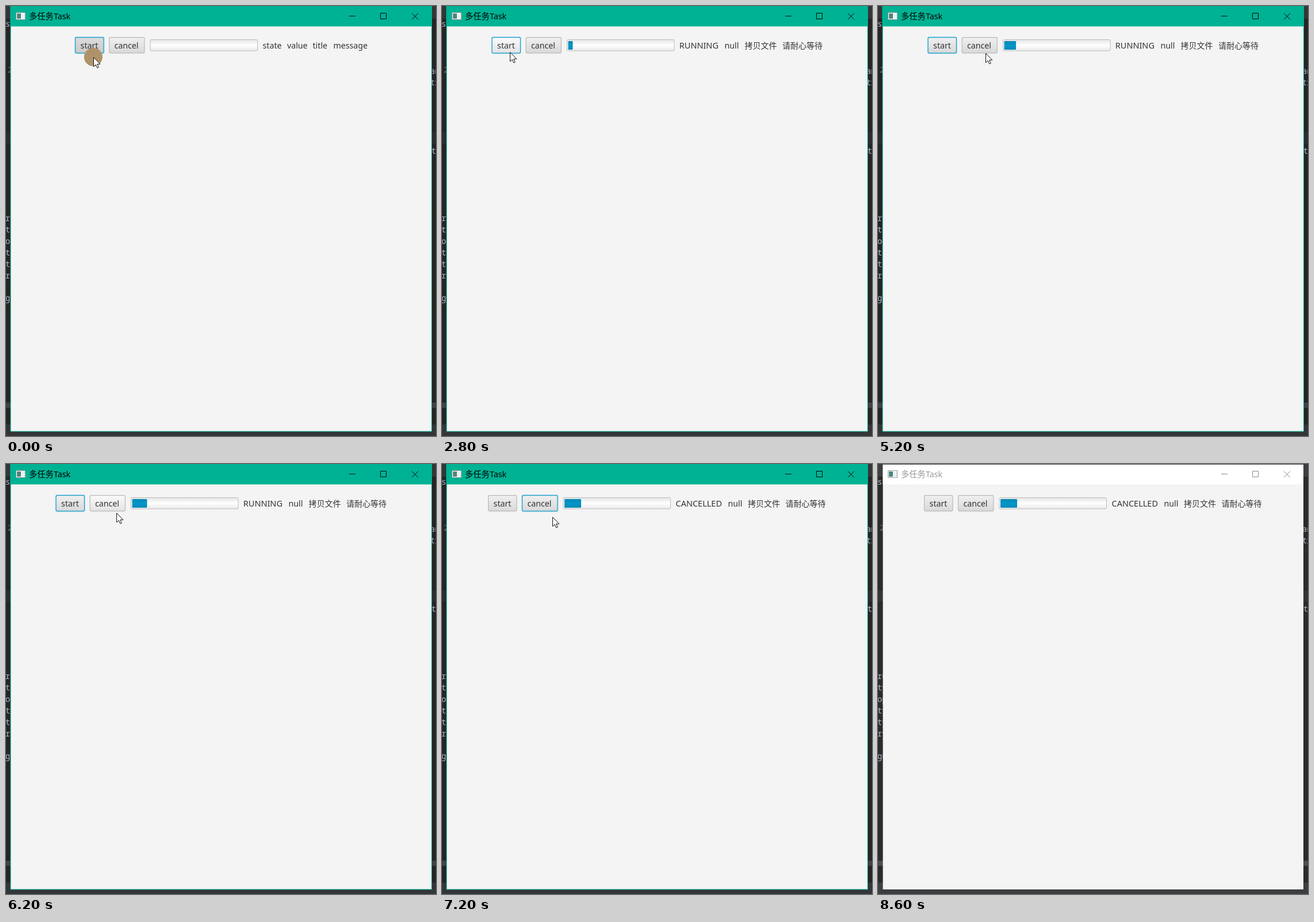
Write an HTML page that moves like this. It is 748 by 748 pixels and loops after 8800 ms.

```html
<!DOCTYPE html>
<html lang="zh">
<head>
<meta charset="utf-8">
<title>Task</title>
<style>
html, body { margin: 0; width: 100%; height: 100%; overflow: hidden; background: #2b2b2b; }
svg { display: block; width: 100vw; height: 100vh; }
text { font: 14.2px "Noto Sans", "Noto Sans CJK SC", "Noto Sans CJK", sans-serif; fill: #333; white-space: pre; }
.code text { font: 13.6px "Noto Sans Mono", "DejaVu Sans Mono", monospace; fill: #a9b7c6; }
.code .dim { fill: #70757a; }
.caps { font-size: 14.5px; }
.zh { font-size: 14px; }
.frame { fill: #f4f4f4; stroke: #00b294; }
.bar { fill: #00b294; }
#title { fill: #000; font-size: 14.3px; }
.ctl { fill: none; stroke: #000; }
.off .frame { stroke: none; }
.off .bar { fill: #fff; }
.off #title { fill: #999; }
.off .ctl { stroke: #888; }
.off #shade { display: none; }
.btn .edge { fill: #b9b9b9; }
.btn .body { fill: url(#normal); }
.btn.hover .body { fill: url(#hover); }
.btn.press .body { fill: url(#press); }
.btn .glow { fill: none; }
.btn.focus .edge { fill: #1a9fcb; }
.btn.focus .glow { fill: #b9e0ee; }
.labels { display: none; }
.labels.on { display: inline; }
</style>
</head>
<body>
<svg viewBox="0 0 748 748" id="stage">
  <defs>
    <linearGradient id="normal" x2="0" y2="1"><stop stop-color="#efefef"/><stop offset="1" stop-color="#d9d9d9"/></linearGradient>
    <linearGradient id="hover" x2="0" y2="1"><stop stop-color="#fafafa"/><stop offset="1" stop-color="#e3e3e3"/></linearGradient>
    <linearGradient id="press" x2="0" y2="1"><stop stop-color="#dcdcdc"/><stop offset="1" stop-color="#c9c9c9"/></linearGradient>
    <linearGradient id="track" x2="0" y2="1"><stop stop-color="#e4e4e4"/><stop offset=".5" stop-color="#fff"/><stop offset="1" stop-color="#e9e9e9"/></linearGradient>
    <linearGradient id="fill" x2="0" y2="1"><stop stop-color="#0587b5"/><stop offset=".5" stop-color="#0296c8"/><stop offset="1" stop-color="#0589b8"/></linearGradient>
  </defs>

  <!-- editor behind the window -->
  <rect width="748" height="748" fill="#2b2b2c"/>
  <rect width="748" height="22" fill="#3c3f41"/>
  <rect y="220" width="748" height="19" fill="#343537"/>
  <rect y="690" width="748" height="9" fill="#4b4e51"/>
  <rect y="728" width="748" height="20" fill="#3c3f42"/>
  <rect id="shade" width="748" height="748" opacity=".15"/>
  <g class="code">
    <text x="-1" y="36">st</text><text x="3" y="116" class="dim">2</text>
    <text x="-1" y="374">re</text><text x="-1" y="394">ty</text>
    <text x="-1" y="414">op</text><text x="-1" y="434">ty</text>
    <text x="-1" y="454">ty</text><text x="-1" y="474">ry</text>
    <text x="-1" y="513">ge</text>
    <text x="738" y="118">an</text><text x="738" y="138">tr</text><text x="740" y="257">t</text>
  </g>

  <!-- window -->
  <rect class="frame" id="frame" x="8" y="-.5" width="732.5" height="740.5"/>
  <rect class="bar" id="bar"/>
  <rect x="17.5" y="11.5" width="16" height="12" fill="#fff" stroke="#8d9a98"/>
  <rect x="19" y="13" width="7" height="9" fill="#4c8580"/>
  <path d="M28.5 13v9M31.5 13v9" stroke="#c4d3d3"/>
  <text id="title" x="40" y="23">多任务Task</text>
  <path class="ctl" d="M597 17.5h11M651.5 12.5h10v10h-10zM706 12.5l11 11M717 12.5l-11 11"/>

  <!-- controls -->
  <g id="row">
    <g class="btn" id="start">
      <rect class="glow" x="-1" y="53" width="52.5" height="30.5" rx="4"/>
      <rect class="edge" x="0" y="54" width="50.5" height="28.5" rx="3"/>
      <rect class="body" x="1.2" y="55.2" width="48.1" height="26.1" rx="2"/>
      <text x="9.6" y="74">start</text>
    </g>
    <g class="btn" id="cancel">
      <rect class="glow" x="58" y="53" width="64.5" height="30.5" rx="4"/>
      <rect class="edge" x="59" y="54" width="62.5" height="28.5" rx="3"/>
      <rect class="body" x="60.2" y="55.2" width="60.1" height="26.1" rx="2"/>
      <text x="68.5" y="74">cancel</text>
    </g>
    <rect x="131" y="58.5" width="186.5" height="19.5" rx="2" fill="url(#track)" stroke="#bcbcbc"/>
    <rect id="fillBar" x="133" y="61" height="15" rx="1.5" fill="url(#fill)"/>
  </g>
  <g class="labels">
    <text x="446.5" y="74">state</text><text x="489" y="74">value</text>
    <text x="533.5" y="74">title</text><text x="569.5" y="74">message</text>
  </g>
  <g class="labels">
    <text class="caps" x="412.8" y="74">RUNNING</text><text x="491.5" y="74">null</text>
    <text class="zh" x="526.5" y="74">拷贝文件</text><text class="zh" x="592" y="74">请耐心等待</text>
  </g>
  <g class="labels">
    <text class="caps" x="406.5" y="74">CANCELLED</text><text x="497.5" y="74">null</text>
    <text class="zh" x="532" y="74">拷贝文件</text><text class="zh" x="597.5" y="74">请耐心等待</text>
  </g>

  <circle id="click" r="16" fill="#b0926a"/>
  <path id="cursor" d="M.5.5V16.5L4.2 13.1 6.8 18.8 9.2 17.7 6.7 12.1H11.8Z" fill="#fff" stroke="#111" stroke-linejoin="round"/>
</svg>
<script>
const LOOP = 8800, STEP = 200;
const $ = id => document.getElementById(id);
const labels = document.querySelectorAll('.labels');
const rowX = [120, 86.5, 80];

// pointer stops: time, x, y
const path = [
  [0, 152, 89], [200, 131, 70], [800, 131, 70], [1000, 137, 75], [1200, 137, 75],
  [1600, 122, 66], [2000, 114, 62], [2400, 117, 74], [2800, 118, 80], [3200, 120, 90],
  [3600, 122, 97], [3800, 128, 125], [4000, 146, 190], [4200, 175, 240], [4400, 202, 257],
  [4600, 220, 225], [4800, 213, 165], [5000, 197, 108], [5200, 187, 82], [6000, 191, 84],
  [6400, 193, 86], [7000, 193, 86], [7200, 192, 92], [7400, 200, 170], [7600, 204, 330],
  [7800, 190, 520], [8000, 160, 688], [8200, 160, 760]
];

function pointer(t) {
  const i = path.findIndex(p => p[0] > t);
  if (i < 0) return path[path.length - 1].slice(1);
  const [a, ax, ay] = path[i - 1], [b, bx, by] = path[i];
  const k = (t - a) / (b - a);
  return [ax + (bx - ax) * k, ay + (by - ay) * k];
}

function setButton(id, state) {
  for (const name in state) $(id).classList.toggle(name, state[name]);
}

function setBox(id, box) {
  for (const name in box) $(id).setAttribute(name, box[name]);
}

function draw(t) {
  const within = (a, b) => t >= a && t < b;
  const phase = t < 200 ? 0 : t < 7000 ? 1 : 2;
  const off = t >= 8600;
  const pressed = t < 200 || within(6800, 7000);

  $('stage').classList.toggle('off', off);
  setBox('frame', off ? { x: 8.5, y: 1, width: 731.5, height: 739 } : { x: 8, y: -.5, width: 732.5, height: 740.5 });
  setBox('bar', off ? { x: 8.5, y: 1, width: 731.5, height: 34.5 } : { x: 7.5, y: 0, width: 733.5, height: 35.5 });
  labels.forEach((g, i) => g.classList.toggle('on', i === phase));
  $('row').setAttribute('transform', `translate(${rowX[phase]})`);
  setButton('start', { focus: t < 6800, hover: within(200, 3400), press: t < 200 });
  setButton('cancel', { focus: t >= 6800 && !off, hover: within(5400, 7200), press: within(6800, 7000) });

  const run = Math.min(t, 6800) - 1280;
  $('fillBar').setAttribute('width', Math.max(0, run * .00526));

  const [x, y] = pointer(t);
  $('cursor').setAttribute('transform', `translate(${x} ${y})`);
  $('click').setAttribute('transform', `translate(${x - .2} ${y - .3})`);
  $('click').style.display = pressed ? '' : 'none';
}

const begin = performance.now();
function tick(now) {
  const t = Math.max(0, now - begin) % LOOP;
  draw(Math.floor(t / STEP) * STEP);
  requestAnimationFrame(tick);
}
draw(0);
requestAnimationFrame(tick);
</script>
</body>
</html>
```
